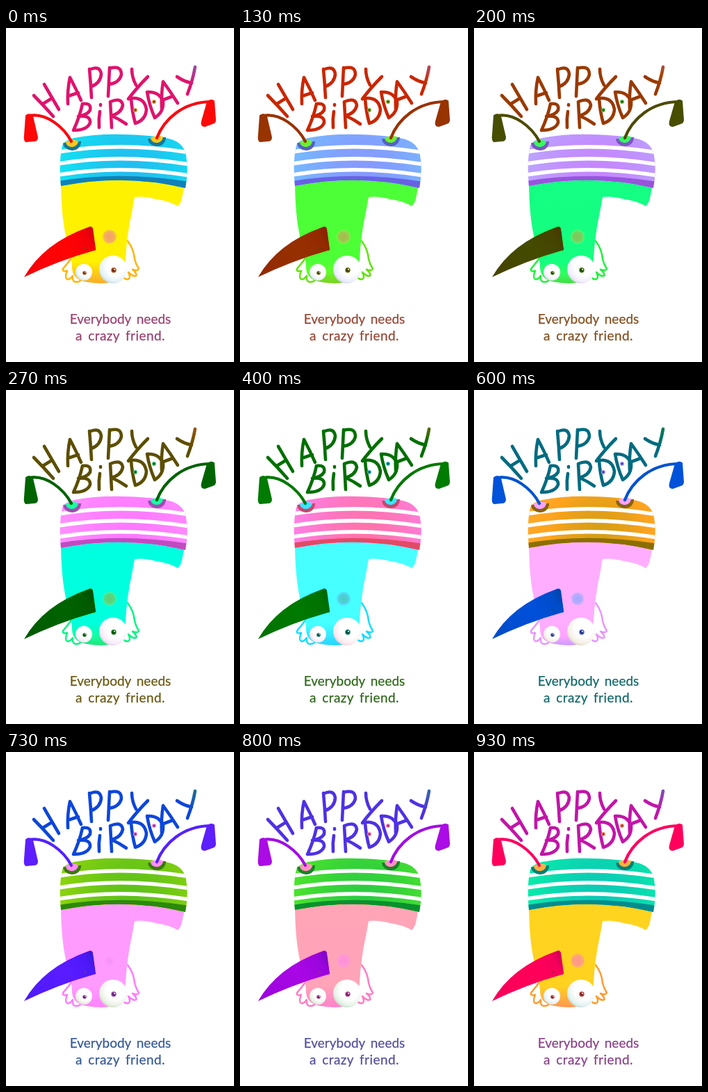
Animation of 328 by 480 pixels, one loop 990 ms. Source, as an HTML page:

```html
<!DOCTYPE html>
<html lang="en">
<head>
<meta charset="utf-8">
<title>Happy Birdday</title>
<style>
html, body { margin: 0; width: 100%; height: 100%; overflow: hidden; background: #fff; }
svg { display: block; width: 100vw; height: 100vh; }
text { font: 19px Lato, "Open Sans", sans-serif; word-spacing: 3px; text-anchor: middle; fill: #9a4070; stroke: #9a4070; stroke-width: .25; }
.ink { fill: none; stroke-linecap: round; stroke-linejoin: round; }
</style>
</head>
<body>
<svg id="card" viewBox="0 0 328 480">
  <defs>
    <linearGradient id="skin" x1="0" y1="222" x2="0" y2="368" gradientUnits="userSpaceOnUse">
      <stop offset="0" stop-color="#fff200"/>
      <stop offset=".78" stop-color="#fff000"/>
      <stop offset="1" stop-color="#f9a82a"/>
    </linearGradient>
    <radialGradient id="cloth" cx="180" cy="205" r="105" gradientUnits="userSpaceOnUse">
      <stop offset="0" stop-color="#22bcf0"/>
      <stop offset=".45" stop-color="#1cc8f0"/>
      <stop offset="1" stop-color="#12e2f2"/>
    </radialGradient>
    <linearGradient id="beak" x1="30" y1="357" x2="128" y2="300" gradientUnits="userSpaceOnUse">
      <stop offset="0" stop-color="#f40008"/>
      <stop offset=".6" stop-color="#ff0404"/>
      <stop offset=".9" stop-color="#f40008"/>
      <stop offset="1" stop-color="#d80010"/>
    </linearGradient>
    <linearGradient id="tip" x1="0" y1="55" x2="0" y2="84" gradientUnits="userSpaceOnUse">
      <stop offset="0" stop-color="#9a4aa0"/>
      <stop offset="1" stop-color="#e0126c"/>
    </linearGradient>
    <radialGradient id="ball" cx=".6" cy=".38" r=".66">
      <stop offset=".5" stop-color="#fff"/>
      <stop offset=".85" stop-color="#e4f1f5"/>
      <stop offset="1" stop-color="#bcd8e2"/>
    </radialGradient>
    <radialGradient id="blush">
      <stop offset="0" stop-color="#f2a06c"/>
      <stop offset=".7" stop-color="#f5ae5c"/>
      <stop offset="1" stop-color="#f9c848"/>
    </radialGradient>
    <clipPath id="trunks">
      <path d="M79 227C77 207 77 186 81 169Q83 162 98 158Q130 152 168 153Q214 154 238 160Q256 166 259 183Q263 205 258 230Q170 209 79 227Z"/>
    </clipPath>
  </defs>

  <g class="ink" stroke="#e0126c" stroke-width="4.6" id="title"></g>
  <path class="ink" d="M272 56Q269 74 261 95" stroke="url(#tip)" stroke-width="4.6"/>
  <g id="dots"></g>

  <g class="ink" stroke="#ffb400" stroke-width="2.5">
    <path d="M94 331Q88 339 82 346Q81 351 88 349Q84 359 88 361Q92 362 96 356Q95 365 101 365Q106 365 109 361"/>
    <path d="M175 306Q184 318 185 332Q187 340 191 346Q190 350 182 347Q189 353 187 356Q183 358 176 351Q180 359 176 361Q170 362 167 355"/>
  </g>

  <path fill="url(#skin)" d="M79 215C79 262 83 292 92 322Q95 336 95 345Q96 362 116 365Q146 370 163 362Q170 350 172 332Q174 296 181 265L185 243Q198 241 216 246Q236 249 247 256Q252 251 253 245L259 215Z"/>

  <g clip-path="url(#trunks)">
    <path fill="url(#cloth)" d="M70 145H270V235H70Z"/>
    <g class="ink" id="bands"></g>
  </g>

  <g id="sockets"></g>

  <g class="ink" stroke="#fa0810" stroke-width="4.2">
    <path d="M94 163C83 142 58 122 34 126"/>
    <path d="M217 158C227 132 254 106 295 106"/>
  </g>
  <g fill="#ff0808" stroke="#ff0808" stroke-width="2" stroke-linejoin="round">
    <path d="M29 126Q34 122 38 127L45 157Q45 162 40 162L29 163Q26 162 27 154Z"/>
    <path d="M290 106Q295 102 299 105L301 132Q301 136 297 137L286 141Q280 141 282 134Z"/>
  </g>

  <circle cx="149" cy="300" r="10" fill="url(#blush)"/>
  <path fill="url(#beak)" d="M26 358Q54 309 119 286Q123 284 125 288L129 317Q130 320 126 320Q76 334 26 358Z"/>
  <circle cx="114" cy="316" r="1.8" fill="#9c3018"/>
  <g id="eyes"></g>

  <text x="164.5" y="425">Everybody needs</text>
  <text x="164.5" y="449" letter-spacing=".45">a crazy friend.</text>
</svg>
<script>
const card = document.getElementById('card');
const put = (id, parts) => { document.getElementById(id).innerHTML = parts.join(''); };
const disc = (x, y, r, fill) => `<circle cx="${x}" cy="${y}" r="${r}" fill="${fill}"/>`;

// Lettering, one entry per glyph
put('title', [
  'M40 97Q54 111 68 127M55 81Q66 100 76 117M53 109L66 101',
  'M89 109Q88 90 92 71Q101 88 108 104M89 98L104 93',
  'M120 59Q122 80 123 100M120 60Q135 53 137 66Q136 79 123 84',
  'M149 57Q148 78 147 98M149 58Q166 53 166 67Q163 79 148 81',
  'M181 59Q181 71 187 82M204 70Q188 86 176 102',
  'M110 109Q106 128 97 147M110 109Q123 107 121 118Q117 125 104 127Q122 125 121 136Q117 147 97 147',
  'M135 120Q133 131 134 143M136 110L136 111',
  'M150 106Q151 124 152 143M150 106Q166 99 168 111Q166 122 152 126Q163 131 173 138',
  'M180 101Q181 119 186 137M180 101Q199 99 202 117Q201 132 186 137',
  'M203 92Q206 111 214 129M203 92Q221 91 226 106Q227 121 214 129',
  'M224 116Q223 96 226 77Q237 92 247 108M224 104L240 98',
  'M246 70Q256 77 267 79'
].map(d => `<path d="${d}"/>`));

put('dots', [[186, 118], [213, 106]].map(([x, y]) =>
  disc(x, y, 3, '#d8a24a') + disc(x, y, 1.8, '#8a3c14')));

const band = (y, w, color) =>
  `<path d="M70 ${y + 3}Q165 ${y - 14} 270 ${y + 4}" stroke="${color}" stroke-width="${w}"/>`;
put('bands', [
  ...[176, 193, 209].map(y => band(y, 5.5, '#fff')),
  band(224, 12, '#1280b8')
]);

put('sockets', [[95, 164, -5], [217, 158, -5]].map(([x, y, a]) =>
  `<g transform="translate(${x} ${y}) rotate(${a})">
    <path d="M-13 0A13 12 0 0 0 13 0Z" fill="#12789a"/>
    <path d="M-9 -1A9 8 0 0 0 9 -1Q0 -5 -9 -1Z" fill="#f8c81c"/>
  </g>`));

put('eyes', [[112, 351, 12, 2.8], [154, 347, 20, 3.7]].map(([x, y, r, p]) =>
  disc(x, y, r, 'url(#ball)') + disc(x + 1, y + 1, p, '#a8501c') +
  disc(x + 1, y + 1, p * .6, '#6c2408') + disc(x + 2, y, p * .3, '#fff')));

// The whole card turns through the colour wheel in 15 hard steps
const LOOP = 990, STEPS = 15;
const stepStart = k => Math.round(k * 100 / STEPS) * 10;

function draw(t) {
  let k = STEPS - 1;
  while (k > 0 && stepStart(k) > t) k--;
  card.style.filter = `hue-rotate(${k * 360 / STEPS}deg)`;
}

const begin = performance.now();
function tick() {
  draw((performance.now() - begin) % LOOP);
  requestAnimationFrame(tick);
}
draw(0);
requestAnimationFrame(tick);
</script>
</body>
</html>
```
